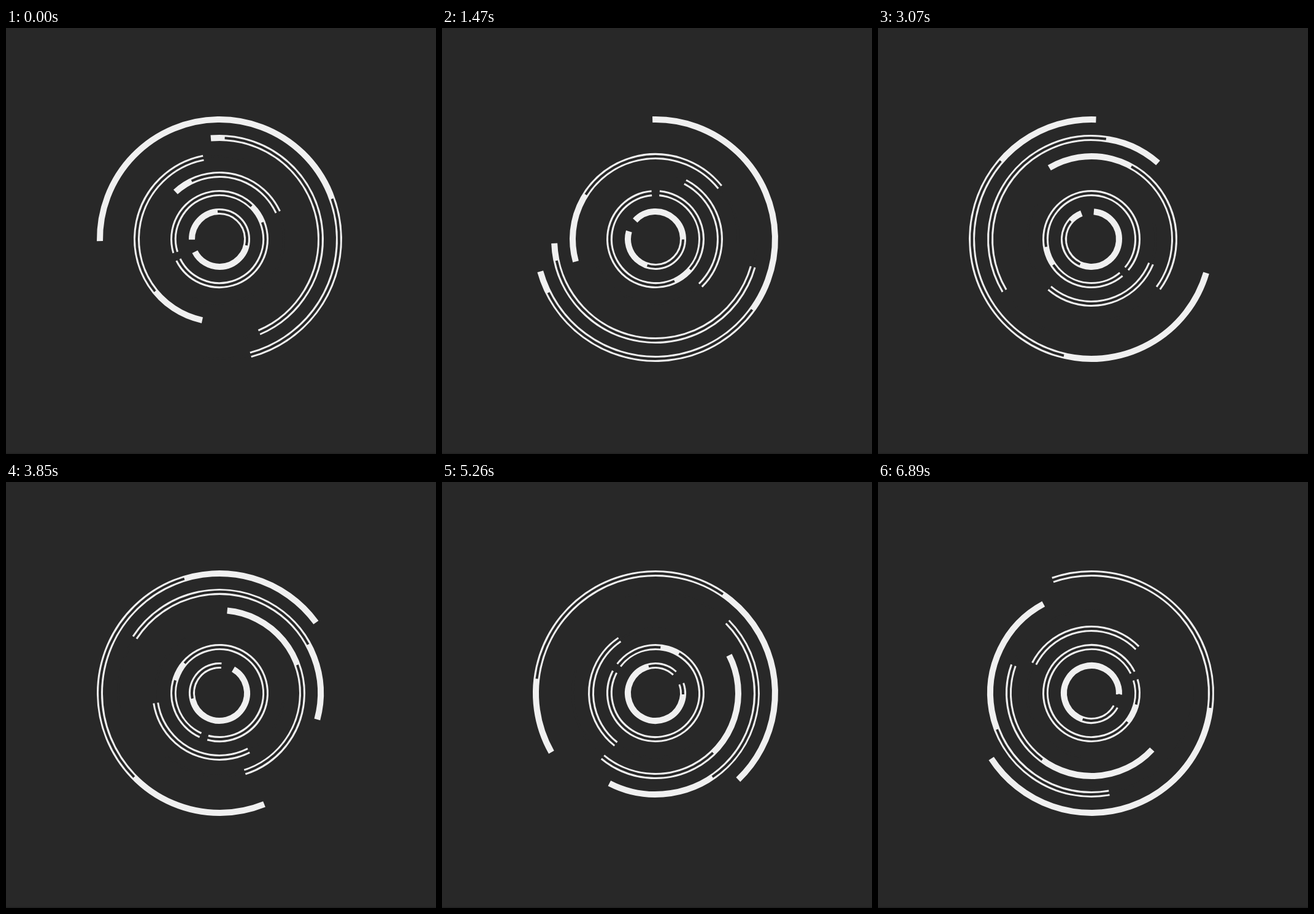
These frames come from a looping animation (701x694 px, 6.91 s). An HTML page with a canvas:

```html
<!DOCTYPE html>
<html lang="en">
<head>
<meta charset="utf-8">
<title>Rotating rings</title>
<style>
  html, body { margin: 0; width: 100%; height: 100%; overflow: hidden; background: #282828; }
  canvas { display: block; }
</style>
</head>
<body>
<canvas id="stage" width="701" height="694"></canvas>
<script>
const ctx = document.getElementById('stage').getContext('2d');
const LOOP = 6910, STEP = 40;
const BACK = '#282828', LIGHT = '#f0f0f0';

// Each arc: start angle, length, total turn over the loop (degrees, clockwise).
// The groove is a narrow background-coloured arc that hollows out the band.
const rings = [
  { r: 195, band: [179.1, 255.8, 432],  groove: [-19.7, 117.4, 269.4] },
  { r: 165, band: [-94.9, 161.8, 534.8], groove: [-87, 163, 443] },
  { r: 135, band: [102, 156.8, 300.9],  groove: [141, 150, 345.5] },
  { r: 105, band: [227, 108.2, 340.2],  groove: [244.4, 230, 215] },
  { r: 75,  band: [163.2, 350.3, 540],  groove: [-21.4, 335.6, 420] },
  { r: 45,  band: [179, 334, 210],      groove: [-93.8, 106.8, 455.7] }
];

// The shared clock runs slightly unevenly: [time in ms, part of the turn].
const clock = [[0, 0], [1470, .2071], [2370, .3551], [3850, .5762],
               [5260, .767], [6120, .8797], [6890, 1]];

function turnAt(t) {
  const i = clock.findIndex(([time]) => time > t);
  if (i < 0) return 1;
  const [t0, p0] = clock[i - 1], [t1, p1] = clock[i];
  const steps = Math.round((t1 - t0) / STEP);
  return p0 + (p1 - p0) * Math.floor((t - t0) / (t1 - t0) * steps) / steps;
}

function arc(r, [start, length, total], turn, width, color) {
  const rad = Math.PI / 180, a = (start + total * turn) * rad;
  ctx.beginPath();
  ctx.arc(348, 344, r, a, a + length * rad);
  ctx.lineWidth = width;
  ctx.strokeStyle = color;
  ctx.stroke();
}

function draw() {
  const turn = turnAt(performance.now() % LOOP);
  ctx.fillStyle = BACK;
  ctx.fillRect(0, 0, 701, 694);
  ctx.fillStyle = '#222';
  ctx.fillRect(0, 692, 701, 2);
  for (const { r, band, groove } of rings) {
    arc(r, band, turn, 10, LIGHT);
    arc(r, groove, turn, 4, BACK);
  }
  requestAnimationFrame(draw);
}
draw();
</script>
</body>
</html>
```
